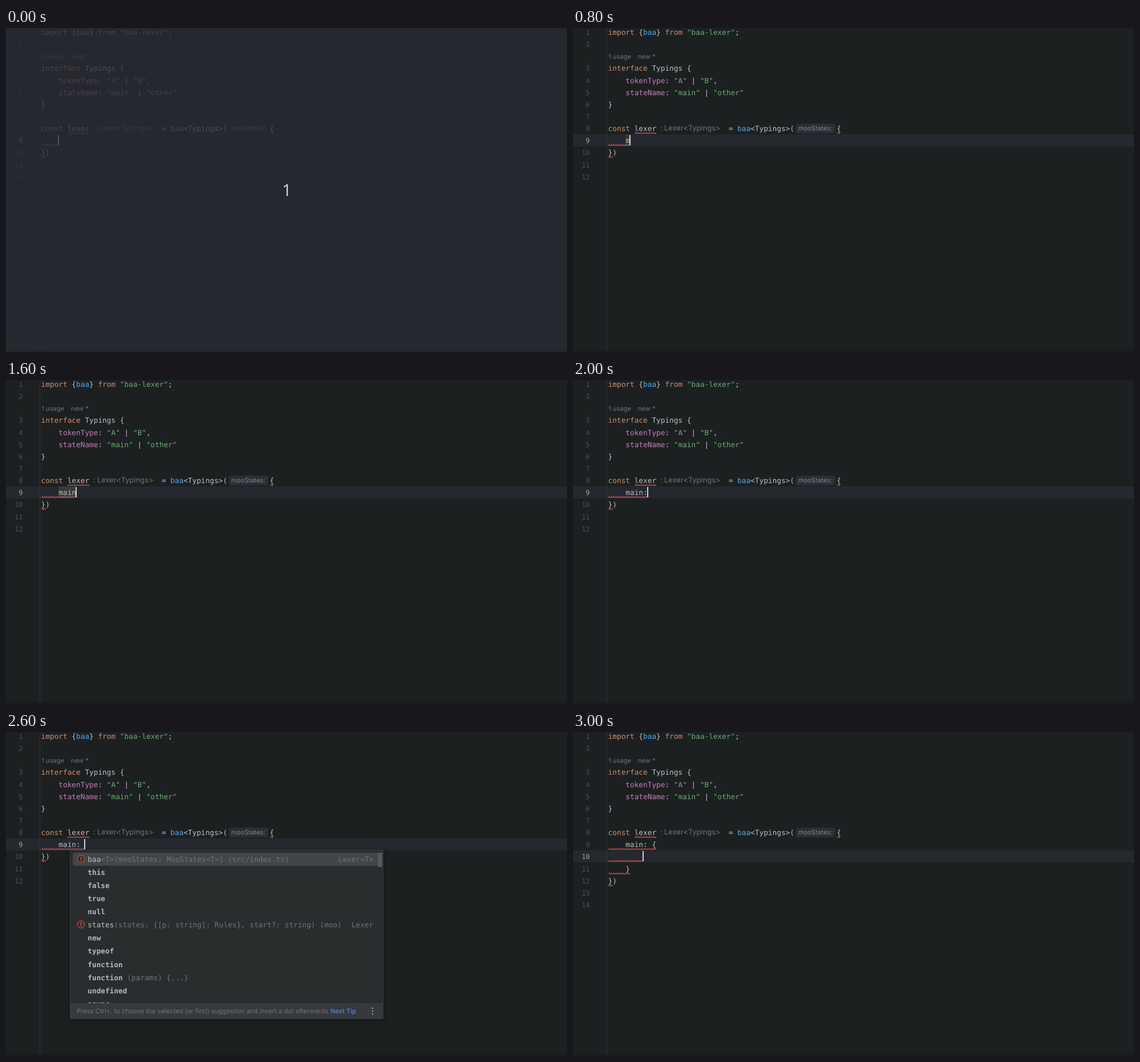
Recreate the animation shown at these times as an HTML page with a canvas. Size 984 by 569 pixels, loop 8000 ms.

```html
<!DOCTYPE html>
<html lang="en">
<head>
<meta charset="utf-8">
<title>Typing in a code editor</title>
<style>
html, body { margin: 0; width: 100%; height: 100%; overflow: hidden; background: #1c2021; }
canvas { display: block; }
</style>
</head>
<body>
<canvas id="stage" width="984" height="569"></canvas>
<script>
const ctx = document.getElementById("stage").getContext("2d");
const LOOP = 8000, CELL = 7.68, LEFT = 61.6, PITCH = 21.15;
const C = {
  bg: "#1c2021", row: "#25282e", text: "#bcbec4", key: "#cf8e6d", fn: "#56a8f5",
  str: "#6aab73", prop: "#c77dbb", dim: "#6f737a", num: "#4b5059", error: "#d9575c",
  panel: "#2a2d2e", foot: "#37393d", pick: "#43454a", link: "#5a8ff0"
};

// Each step lasts until the next one begins.
const steps = [
  { at: 0, code: "", dark: true },
  { at: 200, code: "" },
  { at: 600, code: "", noCaret: true },
  { at: 800, code: "m", mark: true },
  { at: 1000, code: "ma", mark: true, popup: memberPopup },
  { at: 1600, code: "main", mark: true },
  { at: 2000, code: "main:" },
  { at: 2200, code: "main: ", popup: () => valuePopup(null) },
  { at: 2400, code: "main: ", popup: () => valuePopup("") },
  { at: 2600, code: "main: ", popup: () => valuePopup("(states: {[p: string]: Rules}, start?: string) (moo)") },
  { at: 2800, code: "main: {}", back: 1 },
  { at: 3000, code: "main: {", open: true }
];

const col = n => LEFT + n * CELL;
const base = row => Math.round(11.9 + row * PITCH);

function rect(x, y, w, h, color, radius = 0) {
  ctx.fillStyle = color;
  ctx.beginPath();
  ctx.roundRect(x, y, w, h, radius);
  ctx.fill();
}

// Monospaced text, one cell per character; returns the end position.
function mono(text, x, y, color = C.text, bold = false) {
  ctx.font = (bold ? "bold " : "") + '12.76px "DejaVu Sans Mono", monospace';
  ctx.fillStyle = color;
  for (const ch of text) {
    ctx.fillText(ch, x, y);
    x += CELL;
  }
  return x;
}

function sans(text, x, y, color = C.dim, size = 11.25) {
  ctx.font = size + "px Inter, sans-serif";
  ctx.fillStyle = color;
  ctx.fillText(text, x, y);
}

// Alternating text and colour pairs.
function tokens(x, y, ...parts) {
  for (let i = 0; i < parts.length; i += 2) x = mono(parts[i], x, y, parts[i + 1]);
}

function wave(x1, x2, row) {
  const y = base(row) + 3.7;
  ctx.strokeStyle = C.error;
  ctx.lineWidth = 1.1;
  ctx.beginPath();
  for (let x = x1, i = 0; x <= x2; x += 2, i++) ctx.lineTo(x, y + (i % 2 ? -1 : 1));
  ctx.stroke();
}

function lineNumbers(last, current) {
  ctx.font = '11.9px "DejaVu Sans Mono", monospace';
  ctx.textAlign = "right";
  for (let n = 1; n <= last; n++) {
    ctx.fillStyle = n === current ? "#a1a3ab" : C.num;
    ctx.fillText(n, 29.5, base(n < 3 ? n - 1 : n));
  }
  ctx.textAlign = "left";
}

function fixedCode() {
  tokens(LEFT, base(0), "import ", C.key, "{", C.text, "baa", C.fn, "} ", C.text,
    "from ", C.key, '"baa-lexer"', C.str, ";", C.text);
  sans("1 usage", 62, base(2));
  sans("new *", 114, base(2));
  tokens(LEFT, base(3), "interface ", C.key, "Typings {", C.text);
  tokens(col(4), base(4), "tokenType", C.prop, ": ", C.text, '"A"', C.str,
    " | ", C.text, '"B"', C.str, ",", C.text);
  tokens(col(4), base(5), "stateName", C.prop, ": ", C.text, '"main"', C.str,
    " | ", C.text, '"other"', C.str);
  mono("}", LEFT, base(6));

  const y = base(8);
  tokens(LEFT, y, "const ", C.key, "lexer", C.text);
  sans(":", 153, y - 1, C.dim, 12.95);
  sans("Lexer<Typings>", 160, y - 1, C.dim, 12.95);
  tokens(273, y, "= ", C.text, "baa", C.fn, "<Typings>(", C.text);
  rect(391, 168, 69, 17, "#2c2e31", 3);
  sans("mooStates:", 395, y - 1, "#7f838a");
  mono("{", 462.6, y);
  wave(108, 146, 8);
  wave(463, 470, 8);
}

function panel(x, y, w, h, footer) {
  ctx.save();
  ctx.shadowColor = "rgba(0, 0, 0, .35)";
  ctx.shadowBlur = 8;
  ctx.shadowOffsetY = 2;
  rect(x, y, w, h, "#393b3f");
  ctx.restore();
  rect(x + 1, y + 1, w - 2, h - 2, C.panel);
  rect(x + 1, y + h - footer, w - 2, footer - 1, C.foot);
}

function tip(text, x, linkX, dotX, y) {
  sans(text, x, y);
  sans("Next Tip", linkX, y, C.link);
  for (let i = -1; i <= 1; i++) rect(dotX - 1, y - 5 + i * 5, 2, 2, "#ced0d6", 1);
}

function icon(letter, x, y, stroke, fill) {
  ctx.beginPath();
  ctx.arc(x, y, 6.3, 0, 7);
  ctx.fillStyle = fill;
  ctx.fill();
  ctx.strokeStyle = stroke;
  ctx.lineWidth = 1;
  ctx.stroke();
  ctx.textAlign = "center";
  sans(letter, x, y + (letter === "p" ? 2.5 : 3.5), stroke, 10);
  ctx.textAlign = "left";
}

function memberPopup() {
  panel(65, 207, 551, 55, 26);
  rect(70, 211, 541, 24, C.pick, 4);
  icon("p", 85.5, 223, "#a571e6", "#2f2936");
  tokens(96.8, 228, "ma", "#4f8cf0", "in", C.text, " (src/types.ts)", C.dim);
  tip("Press Enter to insert, Tab to replace", 78, 274, 597, 252);
}

// states: null hides the late entry, otherwise its signature.
function valuePopup(states) {
  const late = states !== null;
  const list = ["this", "false", "true", "null", "new", "typeof", "function",
    "function (params) {...}", "undefined", "async", "await"];
  if (late) list.splice(4, 0, "states");

  panel(112, 207, 550, 297, 28);
  rect(117, 212, 540, 23, C.pick, 4);
  rect(652, 212, 8, late ? 25 : 28, "#56585c");
  icon("f", 131.5, 223, "#db5c5c", "#402929");
  tokens(143.3, 228, "baa", C.text, "<T>(mooStates: MooStates<T>) (src/index.ts)", C.dim);
  mono("Lexer<T>", 583, 228, C.dim);

  ctx.save();
  ctx.beginPath();
  ctx.rect(113, 208, 546, 268);
  ctx.clip();
  list.forEach((item, i) => {
    const y = Math.round(251 + i * 23.08);
    if (item === "states") {
      icon("f", 131.5, y - 5, "#db5c5c", "#402929");
      tokens(143.3, y, item, C.text, states, C.dim);
      if (states) mono("Lexer", 605.8, y, C.dim);
      return;
    }
    const [word, ...rest] = item.split(" ");
    const x = mono(word, 143.3, y, "#b4b7bd", true);
    if (rest.length) mono(" " + rest.join(" "), x, y, C.dim);
  });
  ctx.restore();
  tip("Press Ctrl+. to choose the selected (or first) suggestion and insert a dot afterwards",
    124, 569, 643, 494);
}

function draw(t) {
  const s = steps.findLast(step => step.at <= t);
  const caretRow = s.open ? 10 : 9;
  const end = col(4 + s.code.length);
  const rowTop = base(caretRow) - 15;

  rect(0, 0, 984, 569, s.dark ? C.row : C.bg);
  rect(0, rowTop, 984, 21, C.row);
  rect(59, 0, 1, 569, "#313438");
  lineNumbers(s.open ? 14 : 12, caretRow);
  fixedCode();

  if (s.mark) rect(col(4), rowTop, end - col(4), 20, "#373b39");
  mono(s.code, col(4), base(9), s.mark ? "#b9b8a8" : C.text);
  wave(62, end, 9);
  if (s.open) {
    wave(62, col(8), 10);
    mono("}", col(4), base(11));
    wave(62, col(5), 11);
  }
  const close = s.open ? 12 : 10;
  mono("})", LEFT, base(close));
  wave(62, 70, close);

  if (!s.noCaret) {
    const x = s.open ? col(8) : end - (s.back || 0) * CELL;
    rect(Math.round(x) - 1, rowTop + 1, 2, 18, "#ced0d6");
  }
  if (s.popup) s.popup();
  rect(0, 566, 984, 3, "#191b1d");

  if (s.dark) {
    rect(0, 0, 984, 569, "rgba(37, 40, 47, .76)");
    ctx.font = '29px "Open Sans", sans-serif';
    ctx.fillStyle = "#d3d4d6";
    ctx.textAlign = "center";
    ctx.fillText("1", 492.5, 295);
    ctx.textAlign = "left";
  }
}

ctx.textRendering = "geometricPrecision";
const start = performance.now();
function tick() {
  draw((performance.now() - start) % LOOP);
  requestAnimationFrame(tick);
}
tick();
</script>
</body>
</html>
```
